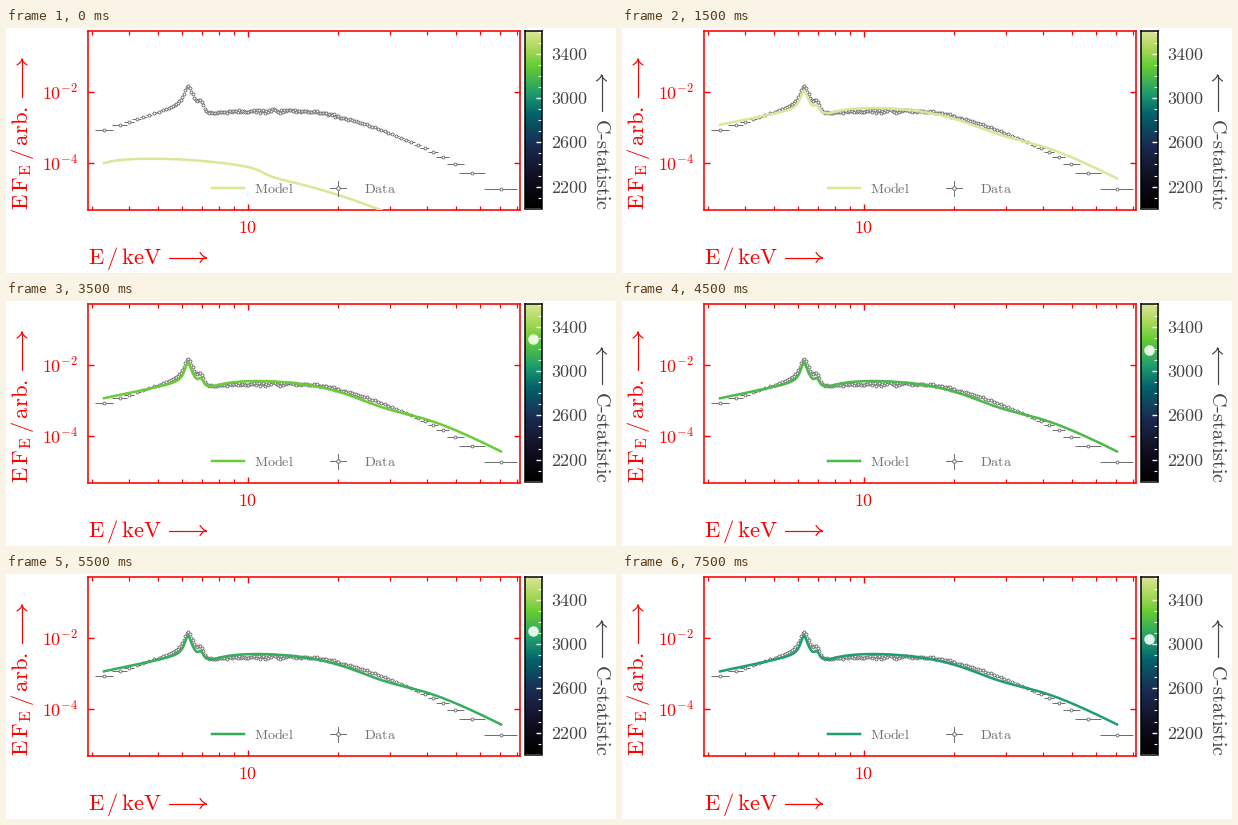
These frames come from a looping animation (610 by 245 pixels, 8 s). A matplotlib script:

```python
import numpy as np
import matplotlib.pyplot as plt
from matplotlib.animation import FuncAnimation
from matplotlib.colors import LinearSegmentedColormap
from matplotlib.ticker import FixedLocator, MultipleLocator, NullFormatter, NullLocator

W, H, DPI = 610, 245, 100
FRAMES, INTERVAL = 16, 500
PT = 72 / DPI
RED, GREY, DARK = "red", "#707070", "#444444"

plt.rcParams["mathtext.fontset"] = "cm"
rng = np.random.default_rng(4)

fig = plt.figure(figsize=(W / DPI, H / DPI), dpi=DPI, facecolor="white")


def box(left, top, right, bottom):
    return [left / W, 1 - bottom / H, (right - left) / W, (bottom - top) / H]


# Stage pixels to data units
def energy(x):
    return 10 ** (1 + (np.asarray(x) - 242) / 298)


def flux(y):
    return 10 ** (-2 - (np.asarray(y) - 64) / 35.6)


def stat(y):
    return 3400 - (y - 26) / 0.1105


# Spectrum axes
ax = fig.add_axes(box(82, 3, 513.5, 181.5))
ax.set(xscale="log", yscale="log",
       xlim=energy([82, 513.5]), ylim=flux([181.5, 3]))
ax.xaxis.set_major_locator(FixedLocator([10]))
ax.xaxis.set_minor_locator(FixedLocator([*range(3, 10), *range(20, 90, 10)]))
ax.yaxis.set_major_locator(FixedLocator([1e-4, 1e-2]))
ax.yaxis.set_minor_locator(NullLocator())
for axis in (ax.xaxis, ax.yaxis):
    axis.set_major_formatter(NullFormatter())
    axis.set_minor_formatter(NullFormatter())
ax.tick_params(which="both", direction="in", color=RED, top=True, right=True)
ax.tick_params(which="major", length=6 * PT, width=1.4 * PT)
ax.tick_params(which="minor", length=4 * PT, width=1.2 * PT)
for spine in ax.spines.values():
    spine.set(color=RED, linewidth=1.6 * PT)

# Colour bar
cmap = LinearSegmentedColormap.from_list("forest", [
    (0, "#000000"), (0.18, "#121022"), (0.36, "#1b2c54"), (0.53, "#02646a"),
    (0.65, "#1f9f6c"), (0.8, "#66cc33"), (0.9, "#acd95c"), (1, "#dbe697")])
LOW, HIGH = stat(180.5), stat(3)
bar = fig.add_axes(box(519, 3, 535.5, 180.5))
bar.imshow(np.linspace(0, 1, 256)[:, None], cmap=cmap, origin="lower",
           aspect="auto", extent=(0, 1, LOW, HIGH))
bar.set_xticks([])
bar.yaxis.tick_right()
bar.yaxis.set_major_locator(FixedLocator(range(2200, 3500, 400)))
bar.yaxis.set_minor_locator(MultipleLocator(100))
bar.yaxis.set_major_formatter(NullFormatter())
bar.tick_params(which="both", direction="in", color="white")
bar.tick_params(which="major", length=6 * PT, width=1.4 * PT)
bar.tick_params(which="minor", length=4 * PT, width=1.1 * PT)
for spine in bar.spines.values():
    spine.set_linewidth(1.5 * PT)

# Pixel-space layer for labels, legend and marker
page = fig.add_axes([0, 0, 1, 1], xlim=(0, W), ylim=(H, 0))
page.axis("off")


def label(x, y, text, size, color, ha="left", rotation=0):
    page.text(x, y, rf"$\mathrm{{{text}}}$", fontsize=size * PT, color=color,
              ha=ha, va="baseline", rotation=rotation, rotation_mode="anchor")


def arrow(x, y, length, color, up=False):
    t = np.linspace(0, 1, 12)
    head = length - 6 * t
    for u, v in ((length * t, 0 * t), (head, 5 * t ** 1.7), (head, -5 * t ** 1.7)):
        px, py = (x + v, y - u) if up else (x + u, y + v)
        page.plot(px, py, color=color, lw=1.2 * PT, solid_capstyle="round")


label(81.5, 235.5, r"E\,/\,keV", 22.7, RED)
arrow(163, 229.5, 37, RED)
label(22.5, 182, r"E\,F_E\,/\,arb.", 22.7, RED, rotation=90)
arrow(16, 69, 38, RED, up=True)
label(242, 205, "10", 18, RED, ha="center")
for power, y in ((-2, 71), (-4, 142)):
    label(72, y, f"10^{{{power}}}", 18, RED, ha="right")
for value in range(2200, 3500, 400):
    label(545, 32 + (3400 - value) * 0.1105, value, 18, DARK)
label(590, 89.5, r"C\text{-}statistic", 20.2, DARK, rotation=270)
arrow(595.5, 83, 36, DARK, up=True)


# Spectral shapes, as stage heights
def sigmoid(t):
    return 1 / (1 + np.exp(-t))


def gauss(t):
    return np.exp(-t ** 2)


def spectrum(x, left, right, amp, width, bump):
    """Two continua joined by an edge, an emission line and a side line."""
    edge = sigmoid((x - 191) / 3)
    right = right + 3 * np.exp(-np.abs(x - 207) / 12)
    line = amp / (1 + ((x - 182) / width) ** 2)
    return left + (right - left) * edge - line - bump * gauss((x - 195) / 3)


def measured(x):
    right = 83 + 0.0289 * np.maximum(x - 300, 0) ** 1.5
    return spectrum(x, 102 - 0.33 * (x - 98), right, 17, 4.5, 7)


def fitted(x, mix):
    d = x - 250
    right = 80 + 0.00158 * d ** 2 / (1 + d / 709) + 5 * gauss((x - 378) / 38)
    left = 96.3 + 1.2 * mix - (0.19 + 0.02 * mix) * (x - 98)
    return spectrum(x, left, right, 17 + 1.5 * mix, 5 - 0.7 * mix, 5.5)


def initial(x):
    return (130.7 + 0.00085 * (x - 145) ** 2 + 6.5 * sigmoid((x - 257) / 5)
            + 2.6 * np.exp(-(x - 98) / 10))


# Data bins: narrow in the middle, wider towards both ends
bins = [494.5]
while bins[-1] > 121:
    x = bins[-1]
    bins.append(x - max(1.5, np.exp((x - 312) / 54.5), 0.16 * (180 - x)))
xs = np.array([98] + bins[::-1])
ys = measured(xs) + rng.normal(0, 0.9, len(xs)) * gauss((xs - 270) / 90)
half = 0.58 * np.gradient(xs)
ax.hlines(flux(ys), energy(xs - half), energy(xs + half), color=GREY,
          lw=1 * PT, zorder=2)
ax.plot(energy(xs), flux(ys), "o", ms=2.9 * PT, mfc="white", mec=GREY,
        mew=0.9 * PT, zorder=3)

grid = np.linspace(98, 495, 300)
model, = ax.plot([], [], lw=2.5 * PT, zorder=4, solid_joinstyle="round")

# Legend
key, = page.plot([206, 238], [160, 160], lw=2.5 * PT, solid_capstyle="projecting")
label(248.5, 165, "Model", 14.2, GREY)
page.plot([324, 340], [160, 160], color=GREY, lw=1 * PT)
page.plot([332, 332], [152.5, 167.5], color=GREY, lw=1 * PT)
page.plot(332, 160, "o", ms=3.6 * PT, mfc="white", mec=GREY, mew=1 * PT)
label(358, 165, "Data", 14.2, GREY)

dot, = page.plot([], [], "o", ms=10.5 * PT, color="white", alpha=0.88, mew=0)


def draw(i):
    y = initial(grid) if i == 0 else fitted(grid, 1 - np.exp((1 - i) / 4))
    model.set_data(energy(grid), flux(y))

    # The statistic enters the bar from above and settles
    level = 72 - 62 * np.exp((4 - i) / 5)
    color = cmap(np.clip((stat(level) - LOW) / (HIGH - LOW), 0, 1))
    model.set_color(color)
    key.set_color(color)
    dot.set_data([527.3], [level])
    dot.set_visible(level > 0)
    return model, key, dot


anim = FuncAnimation(fig, draw, frames=FRAMES, interval=INTERVAL,
                     repeat=True, repeat_delay=0, blit=False)
plt.show()
```
